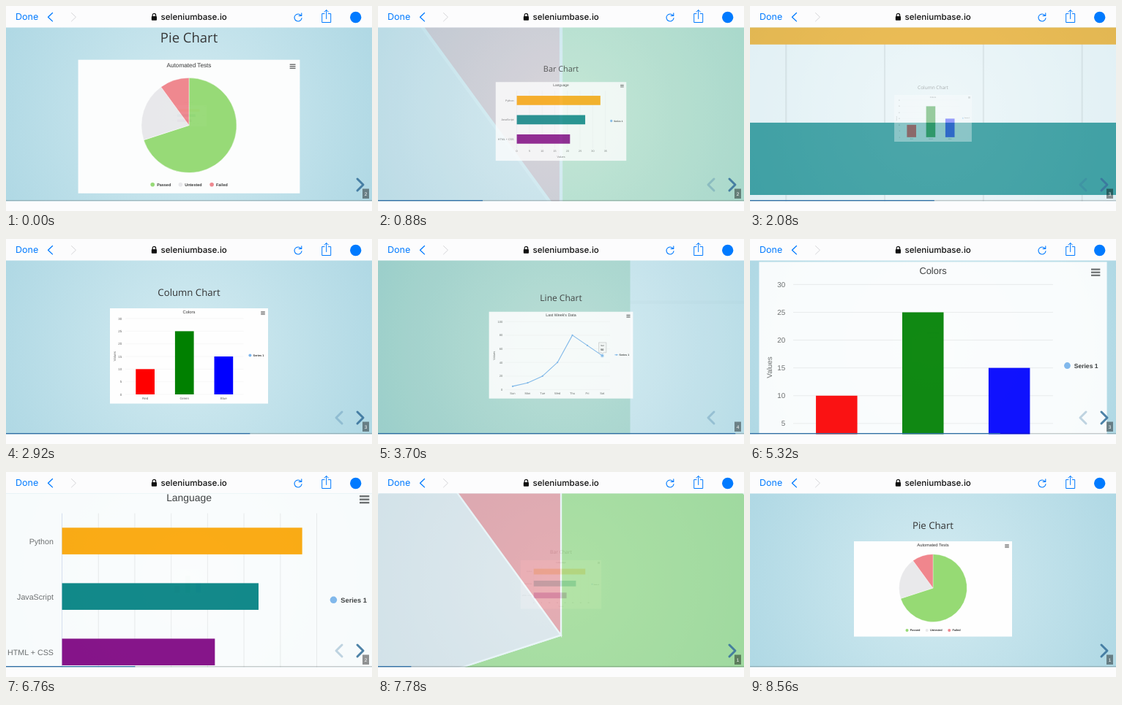
Animation of 500 by 281 pixels, one loop 8960 ms. Source, as an HTML page:

```html
<!DOCTYPE html>
<html lang="en">
<head>
<meta charset="utf-8">
<title>Chart slides</title>
<style>
html, body { margin: 0; height: 100%; overflow: hidden; background: #fff; }
svg { display: block; width: 100vw; height: 100vh; }
text { font-family: "Liberation Sans", Arial, sans-serif; text-rendering: geometricPrecision; }
.ui text { font-family: Inter, sans-serif; }
.heading { font-family: "Open Sans", sans-serif; }
.line { fill: none; stroke-linecap: round; stroke-linejoin: round; }
</style>
</head>
<body>
<svg viewBox="0 0 500 281">
  <defs>
    <radialGradient id="sky" gradientUnits="userSpaceOnUse" cx="250" cy="148" r="280">
      <stop offset="0" stop-color="#d3ebf1"/>
      <stop offset="1" stop-color="#afd8e4"/>
    </radialGradient>
    <clipPath id="view"><rect y="29.5" width="500" height="238"/></clipPath>
  </defs>
  <rect width="500" height="281" fill="#fcfcfd"/>
  <g clip-path="url(#view)">
    <rect y="29" width="500" height="239" fill="url(#sky)"/>
    <g id="deck"></g>
    <rect y="266" width="500" height="1.5" fill="#000" fill-opacity=".2"/>
    <rect id="bar" y="266" height="1.5" fill="#2f6ea5"/>
    <g class="line" stroke="#3b759e" stroke-width="3">
      <path id="left" d="M459 237l-8 8 8 8"/>
      <path id="right" d="M480 237l8 8-8 8"/>
    </g>
    <rect x="487" y="250.5" width="9" height="13.5" fill="#000" fill-opacity=".42"/>
    <text id="num" x="491.5" y="259.8" font-size="6.5" fill="#fff" text-anchor="middle"></text>
  </g>
  <g class="ui">
    <text x="13" y="19.4" font-size="12.5" fill="#007aff">Done</text>
    <text x="211.5" y="19.2" font-size="11.6" font-weight="500" fill="#111">seleniumbase.io</text>
  </g>
  <g class="line" stroke="#007aff" stroke-width="1.3">
    <path d="M63.5 9.5l-6 5.7 6 5.7"/>
    <path d="M89.5 9.5l6 5.7-6 5.7" stroke="#d6d6d9" stroke-width="1"/>
    <path d="M403.2 13.2A5 5 0 1 0 404 16.5M403.8 9.8v3.6h-3.6" stroke-width="1.1"/>
    <path d="M435 10.5h-3.3v12h12v-12h-3.3M437.7 17.5v-12M434.9 8.2l2.8-2.8 2.8 2.8" stroke-width="1"/>
    <path d="M200.2 14.5v-2a2.2 2.2 0 0 1 4.4 0v2" stroke="#111" stroke-width="1.2"/>
  </g>
  <rect x="198.8" y="14" width="7.2" height="5.8" rx="1" fill="#111"/>
  <circle cx="477.7" cy="15.5" r="7.7" fill="#007aff"/>
</svg>
<script>
const LOOP = 8960, STEP = 60;
const $ = id => document.getElementById(id);

// Slide drawings use coordinates around the slide centre.
const text = (s, x, y, size, extra = '') => `<text x="${x}" y="${y}" font-size="${size}" ${extra}>${s}</text>`;
const rect = (x, y, w, h, fill) => `<rect x="${x}" y="${y}" width="${w}" height="${h}" fill="${fill}"/>`;
const dot = (x, y, r, fill, extra = '') => `<circle cx="${x}" cy="${y}" r="${r}" fill="${fill}" ${extra}/>`;
const rule = (x1, y1, x2, y2, color = '#e6e6e6', width = .33) =>
  `<path d="M${x1} ${y1}L${x2} ${y2}" stroke="${color}" stroke-width="${width}"/>`;
const MID = 'text-anchor="middle" ', END = 'text-anchor="end" ';
const GREY = 'fill="#666" ', DARK = 'fill="#333" ', BOLD = 'font-weight="bold" ';
const BLUE = '#7cb5ec';
const label = (s, x, y, align = MID) => text(s, x, y, 4.5, align + GREY);
const legend = (s, x, y, fill, r = 2) => dot(x, y, r, fill) + text(s, x + 4.2, y + 1.4, 3.9, BOLD + DARK);
const turned = (x, y) => `<g transform="translate(${x} ${y}) rotate(-90)">${label('Values', 0, 0)}</g>`;

const frame = (heading, title, body) =>
  text(heading, 0, -69.7, 13.2, MID + DARK + 'class="heading"') +
  rect(-108, -53, 216, 130.6, '#fefefe') +
  text(title, 0, -45.6, 5.85, MID + DARK) +
  [-1.85, 0, 1.85].map(d => rect(98.2, d - 47, 5.6, 1, '#666')).join('') + body;

function pie() {
  const R = 46.4, cy = 11.1;
  const at = f => `${R * Math.sin(f * 2 * Math.PI)} ${cy - R * Math.cos(f * 2 * Math.PI)}`;
  const parts = [['Passed', 0, .7, '#96da74', -35.5], ['Untested', .7, .9, '#e9e9eb', -8.3], ['Failed', .9, 1, '#f0868d', 22.2]];
  return frame('Pie Chart', 'Automated Tests', parts.map(([name, a, b, fill, x]) =>
    `<path d="M0 ${cy}L${at(a)}A${R} ${R} 0 ${b - a > .5 ? 1 : 0} 1 ${at(b)}Z" fill="${fill}" stroke="#fff" stroke-width=".33"/>` +
    legend(name, x, 69, fill)).join(''));
}

function bars() {
  const x0 = -73.1, unit = 4.19;
  let s = '';
  for (let v = 0; v <= 35; v += 5) {
    const x = x0 + v * unit;
    s += rule(x, -38.5, x, 57.6, v ? '#e6e6e6' : '#ccd6eb') + label(v, x, 63);
  }
  [['Python', 33, 'orange'], ['JavaScript', 27, 'teal'], ['HTML + CSS', 21, 'purple']].forEach(([name, v, fill], i) => {
    const y = -22.5 + i * 32.05;
    s += rect(x0, y - 7.7, v * unit, 15.4, fill) + label(name, x0 - 4.9, y + 1.8, END);
  });
  return frame('Bar Chart', 'Language', s + label('Values', 0, 73) + legend('Series 1', 83.2, 11.5, BLUE));
}

function columns() {
  const y0 = 65, unit = 3.464;
  let s = '';
  for (let v = 0; v <= 30; v += 5) {
    const y = y0 - v * unit;
    s += rule(-86.8, y, 74.5, y) + label(v, -91.7, y + 1.6, END);
  }
  [['Red', 10, 'red'], ['Green', 25, 'green'], ['Blue', 15, 'blue']].forEach(([name, v, fill], i) => {
    const x = -72.7 + i * 53.6;
    s += rect(x, y0 - v * unit, 25.7, v * unit, fill) + label(name, x + 12.85, 72.4);
  });
  return frame('Column Chart', 'Colors', s + turned(-100, 12.7) + legend('Series 1', 83.4, 11.6, BLUE));
}

function line() {
  const y0 = 64.3, unit = 1.025, days = ['Sun', 'Mon', 'Tue', 'Wed', 'Thu', 'Fri', 'Sat'];
  let s = '';
  for (let v = 0; v <= 100; v += 20) {
    const y = y0 - v * unit;
    s += rule(-84, y, 73.6, y) + label(v, -87.5, y + 1.6, END);
  }
  const pts = [5, 10, 20, 40, 80, 65, 50].map((v, i) => [-72.5 + i * 22.4, y0 - v * unit]);
  s += `<path class="line" d="M${pts.join('L')}" stroke="${BLUE}" stroke-width="1.2"/>`;
  pts.forEach(([x, y], i) => s += dot(x, y, 1.2, BLUE) + label(days[i], x, 71.3));
  const [x, y] = pts[6];
  s += dot(x, y, 3, BLUE, 'fill-opacity=".3"') + dot(x, y, 1.7, BLUE) +
    `<path d="M56.7 -6.7h11.2v15.2h-4l-1.6 1.9-1.6-1.9h-4z" fill="#f9f9f9" stroke="#999" stroke-width=".4"/>` +
    text('Sat', x, -1.2, 3.2, MID + DARK) + text('50', x, 5.2, 4.1, MID + BOLD + DARK);
  s += rule(80.4, 11.8, 86, 11.8, BLUE, .8) + legend('Series 1', 83.2, 11.8, BLUE, 1.2);
  return frame('Line Chart', "Last Week's Data", s + turned(-99, 13));
}

const deck = $('deck');
const slides = [pie, bars, columns, line].map(draw => {
  const g = document.createElementNS('http://www.w3.org/2000/svg', 'g');
  g.innerHTML = draw();
  return deck.appendChild(g);
});

function bezier(x1, y1, x2, y2) {
  const cubic = (a, b, s) => 3 * a * s * (1 - s) ** 2 + 3 * b * s * s * (1 - s) + s ** 3;
  return x => {
    if (x <= 0) return 0;
    if (x >= 1) return 1;
    let lo = 0, hi = 1;
    for (let i = 0; i < 24; i++) {
      const m = (lo + hi) / 2;
      if (cubic(x1, x2, m) < x) lo = m; else hi = m;
    }
    return cubic(y1, y2, lo);
  };
}
const ease = bezier(.25, .1, .25, 1), glide = bezier(.26, .86, .44, .985);
const mix = (a, b, p) => a + (b - a) * p;

// [first step at, slide shown, lag in steps]
const moves = [[460, 1, .31], [1900, 2, .33], [3160, 3, .33], [4720, 2, .48], [6220, 1, -.19], [7480, 0, .33]];
const zoom = (i, cur) => i < cur ? 16 : i > cur ? .2 : 1;

function render(t) {
  let n = 0;
  while (n < moves.length - 1 && t >= moves[n + 1][0]) n++;
  const [start, cur, lag] = moves[n], prev = n ? moves[n - 1][1] : 0;
  const step = Math.max(1, Math.floor((t - start) / STEP) + 1);
  const x = Math.min(1, (step - lag) / 16), p = ease(x);

  slides.forEach((g, i) => {
    const alpha = mix(+(i === prev), +(i === cur), p);
    g.setAttribute('transform', `translate(250 148) scale(${mix(zoom(i, prev), zoom(i, cur), p)})`);
    g.setAttribute('opacity', alpha);
    g.style.display = alpha ? '' : 'none';
  });
  if (deck.lastChild !== slides[cur]) deck.appendChild(slides[cur]);

  // The controls start slightly after the slides; at rest they are complete.
  const late = x < 1 ? x - .045 : 1;
  const fade = Math.min(1, Math.max(0, late * 4));
  $('left').setAttribute('opacity', .3 * mix(+(prev > 0), +(cur > 0), fade));
  $('right').setAttribute('opacity', .9 * mix(+(prev < 3), +(cur < 3), fade));
  $('bar').setAttribute('width', 500 / 3 * mix(prev, cur, glide(late)));
  $('num').textContent = cur + 1;
}

const begin = performance.now();
function tick() {
  render((performance.now() - begin) % LOOP);
  requestAnimationFrame(tick);
}
tick();
</script>
</body>
</html>
```
